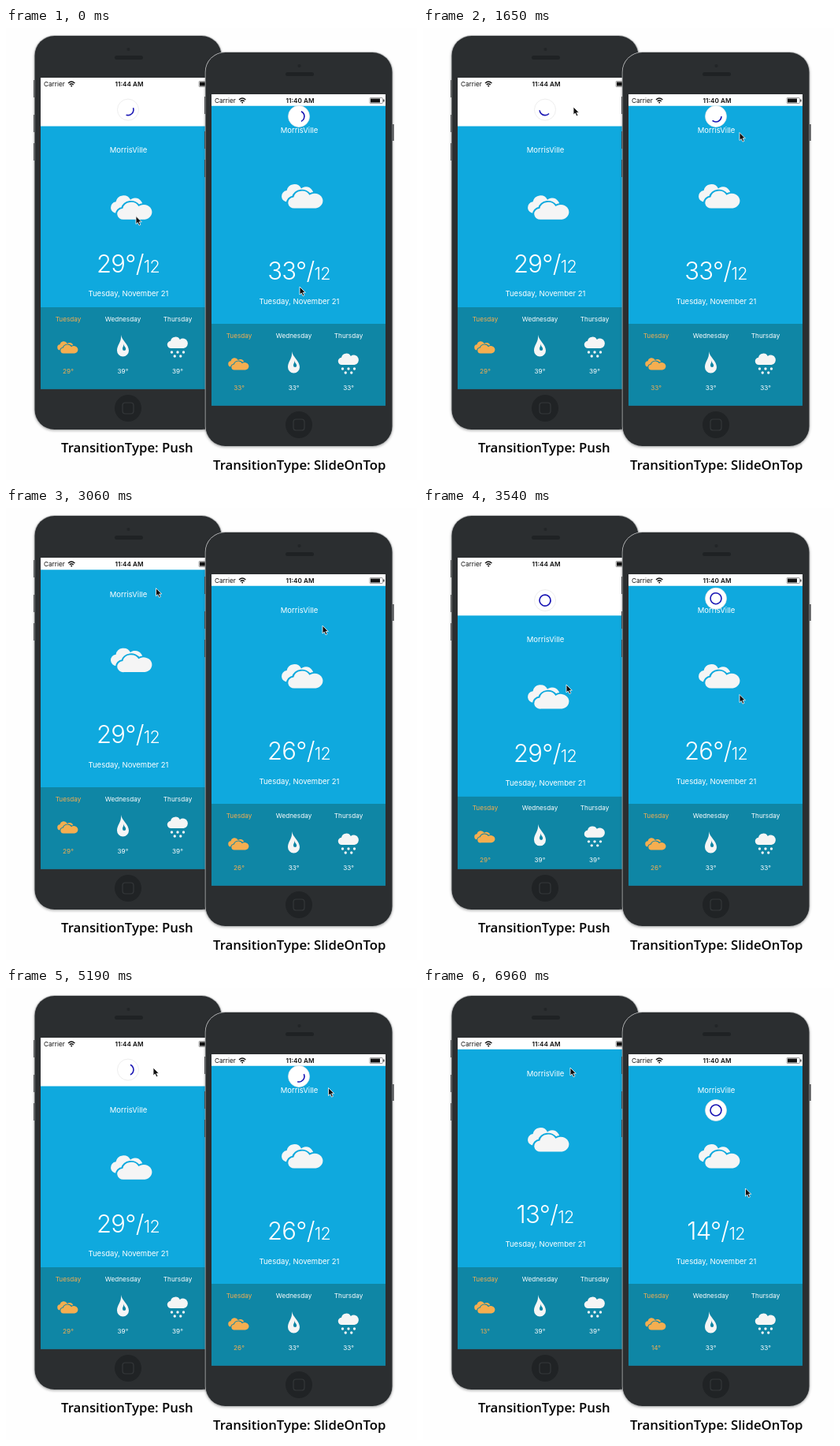
These frames come from a looping animation (522x573 px, 6990 ms). An HTML page:

```html
<!DOCTYPE html>
<html lang="en">
<head>
<meta charset="utf-8">
<title>Pull to refresh transitions</title>
<style>
  html, body { margin: 0; width: 100%; height: 100%; overflow: hidden; background: #fefefe; }
  svg { display: block; font-family: Inter, Roboto, sans-serif; }
  .body { fill: #2b2e30; stroke: #b4b6b7; stroke-width: 1.6; paint-order: stroke; filter: drop-shadow(0 1px 1.5px #0004); }
  .mid { text-anchor: middle; }
  .head { fill: #fff; font-size: 9.5px; }
  .temp { font-size: 31px; font-weight: 350; letter-spacing: -.7px; }
  .low { font-size: 21.5px; }
  .days { font-size: 8.2px; --bg: #0f86a5; fill: #fff; color: #f5f5f5; }
  .today { fill: #f5ae50; color: #f5ae50; }
  .sky { --bg: #0fa9de; color: #f5f5f5; }
  .icon { fill: currentColor; }
  .status { font-size: 8.2px; fill: #111; }
  .line { fill: none; stroke: #111; stroke-width: 1.3; }
  .caption { font: 600 16.75px "Open Sans", "Noto Sans", sans-serif; fill: #000; }
</style>
</head>
<body>
<svg id="stage" width="522" height="573" viewBox="0 0 522 573"></svg>
<script>
const LOOP = 6990, HOLD = 47, SPIN = 0.257;

const defs = `<defs>
  <clipPath id="screen"><path d="M44 77.5h221v380h-221z"/></clipPath>
  <path id="cloud" d="M-14 0a8 8 0 0 1-1.5-16a11 11 0 0 1 20.5-3a10.7 10.7 0 1 1 8 19z"/>
  <g id="clouds" class="icon">
    <use href="#cloud" transform="translate(-6 9) scale(.9)"/>
    <use href="#cloud" transform="translate(4 17) scale(.98 .88)" style="stroke:var(--bg);stroke-width:4.5;paint-order:stroke"/>
  </g>
  <path id="arrow" d="M0 0v10l2.3-2 1.7 3.7 1.9-.9-1.7-3.5h3.1z" fill="#111" stroke="#fff" stroke-width=".8"/>
</defs>`;

const drops = Array.from({ length: 5 }, (_, i) =>
  `<circle cx="${210.5 + i * 3.75}" cy="${i % 2 ? 416 : 411}" r="1.7"/>`).join('');

const icons = [
  '<use href="#clouds" transform="translate(-.5 404) scale(.5)"/>',
  `<path class="icon" d="M-2.5 389c1 7 10 12 10 20a7.5 7.5 0 0 1-15 0c0-8 6-10 5-20z"/>
   <path d="M1 400c0 4 2.700 4 2.700 7a2 2 0 0 1-4.200 0c0-3 1.500-3 1.500-7z" fill="var(--bg)"/>`,
  `<g class="icon"><use href="#cloud" transform="translate(0 406) scale(.58)"/><g transform="translate(-218)">${drops}</g></g>`
];

const day = (name, i, temp) => `<g class="${i ? '' : 'today'}" transform="translate(${79 + i * 69.5})">
  <text y="371.500">${name}</text>${icons[i]}<text class="${i ? '' : 'now'}" y="437.500">${temp}</text></g>`;

const phone = (id, dx, dy, clock, other) => `<g id="${id}" transform="translate(${dx} ${dy})">
  <path d="M35 66h2v22h-2zM35 110h2v22h-2zM35 146h2v22h-2zM273 101h2.500v21h-2.500z" fill="#222527"/>
  <rect class="body" x="36.500" y="10" width="237" height="499" rx="25"/>
  <circle cx="155.500" cy="27" r="2" fill="#222527"/>
  <rect x="138" y="35" width="36" height="5" rx="2.500" fill="#1f2224"/>
  <circle cx="155" cy="482" r="17" fill="#202325"/>
  <rect x="148" y="475" width="14" height="14" rx="3.500" fill="none" stroke="#34383a" stroke-width="1.200"/>
  <rect x="44" y="63" width="221" height="394" fill="#fff"/>
  <g class="status">
    <text x="48" y="74">Carrier</text>
    <path class="line" d="M79 70q4-4 8.400 0M80.700 72q2.500-2.500 5 0"/>
    <circle cx="83.200" cy="73.500" r="1"/>
    <text class="mid" x="156.500" y="74" font-weight="600">${clock}</text>
    <rect x="245" y="67.500" width="16.500" height="7" rx="1" fill="none" stroke="#777" stroke-width=".7"/>
    <path d="M246 68.500h12v5h-12zM262.300 69.500h1.200v3h-1.200z"/>
  </g>
  <g clip-path="url(#screen)">
    <rect class="blue" x="44" y="77.500" width="221" height="460" fill="#0fa9de"/>
    <g class="head mid">
      <text class="town" x="155.500" y="112">MorrisVille</text>
      <g class="sky"><use href="#clouds" x="159.500" y="190.500"/></g>
      <g class="reading">
        <text class="temp" x="155" y="298"><tspan class="high"></tspan>/<tspan class="low">12</tspan></text>
        <text x="155.500" y="328.500">Tuesday, November 21</text>
      </g>
    </g>
    <g class="days mid">
      <rect x="44" y="354" width="221" height="110" fill="#0f86a5"/>
      ${['Tuesday', 'Wednesday', 'Thursday'].map((name, i) => day(name, i, other)).join('')}
    </g>
    <g class="spinner">
      <circle r="13.500" fill="#fff" stroke="#e6e6e6" stroke-width=".7"/>
      <circle class="ring" r="7" fill="none" stroke="#1a16b4" stroke-width="1.600" pathLength="360"/>
    </g>
  </g>
</g>`;

const stage = document.getElementById('stage');
stage.innerHTML = defs
  + phone('push', 0, 0, '11:44 AM', '39°')
  + phone('slide', 217, 21, '11:40 AM', '33°')
  + `<text class="caption" x="70" y="538">TransitionType: Push</text>
     <text class="caption" x="263" y="560">TransitionType: SlideOnTop</text>
     <use id="hand1" href="#arrow"/><use id="hand2" href="#arrow"/>`;

const part = id => name => document.querySelector(`#${id} .${name}`);
const push = part('push'), slide = part('slide');
const hand1 = document.getElementById('hand1'), hand2 = document.getElementById('hand2');

const move = (el, x, y, more = '') => el.setAttribute('transform', `translate(${x} ${y}) ${more}`);

// A null angle draws the full ring shown while dragging.
function spinner(get, y, scale, angle) {
  move(get('spinner'), 155, y, `scale(${scale})`);
  const ring = get('ring');
  ring.setAttribute('stroke-dasharray', angle === null ? 'none' : '130 230');
  ring.setAttribute('transform', `rotate(${(angle || 0) - 65})`);
}

function reading(get, value) {
  get('high').textContent = get('now').textContent = value + '°';
}

function draw(t) {
  // Smooth step from 0 to 1 between two times.
  const ramp = (from, to) => {
    const k = Math.min(1, Math.max(0, (t - from) / (to - from)));
    return k * k * (3 - 2 * k);
  };
  const turn = (first, second) => t < 3500 ? first + SPIN * t : second + SPIN * (t - 5190);
  const reach = ramp(600, 1200);

  // Push: the header makes room up to HOLD, then everything slides.
  const drag = 133 * ramp(3020, 3640);
  const pull = HOLD * (1 - ramp(2780, 2900) - ramp(6700, 6900)) + .475 * drag - 16.2 * ramp(3900, 4380);
  const room = Math.min(pull, HOLD), extra = pull - room;
  move(push('blue'), 0, pull);
  move(push('town'), 0, pull - room * .02);
  move(push('sky'), 0, room * .75 + extra);
  move(push('reading'), 0, room * .255 + extra);
  move(push('days'), 0, extra);
  spinner(push, 50 + 1.14 * pull,
    1 - ramp(2600, 2720) + ramp(2960, 3020) - ramp(6500, 6620),
    t > 2950 && t < 3930 ? null : turn(45, 0));
  reading(push, t < 6540 ? 29 : 13);

  const back = ramp(4300, 4900);
  move(hand1, 165 + 26 * reach - 9 * ramp(2980, 3540) + 5 * back, 238.5 - 138.5 * reach + drag - 132 * back);

  // SlideOnTop: only the indicator moves, above the content.
  const drop = ramp(3020, 3300) + ramp(6680, 6960);
  const hide = ramp(2880, 2900) + ramp(6650, 6660);
  spinner(slide, 91 - 31 * hide + 74 * drop - 43 * ramp(3380, 3570),
    1 - ramp(2720, 2840) + ramp(2950, 2960) - ramp(6520, 6640) + ramp(6670, 6680),
    t > 2900 && t < 3570 || t > 6645 ? null : turn(0, 40));
  reading(slide, t < 2700 ? 33 : t < 6540 ? 26 : 14);

  const lift = ramp(4200, 4800);
  move(hand2, 373 + 29 * reach + 7.5 * lift,
    328 - 195.5 * reach + 104 * ramp(2980, 3300) - 110 * lift + 127.5 * ramp(6680, 6960));
}

const start = performance.now();
function frame() {
  draw((performance.now() - start) % LOOP);
  requestAnimationFrame(frame);
}
frame();
</script>
</body>
</html>
```
